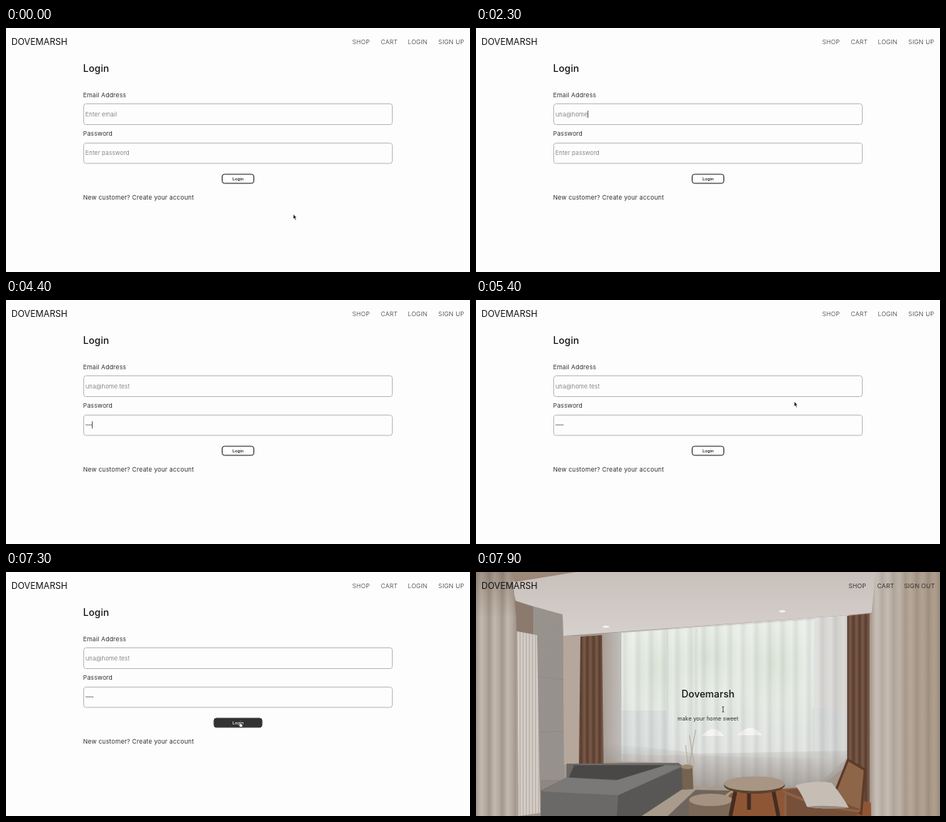
Write an HTML page that moves like this. It is 600 by 317 pixels and loops after 8000 ms.

```html
<!DOCTYPE html>
<html lang="en">
<head>
<meta charset="utf-8">
<title>Shop login</title>
<style>
  html, body { margin: 0; width: 100%; height: 100%; overflow: hidden; background: #fefdfe; }
  svg { display: block; width: 600px; height: 317px; }
  text { font: 400 8px Inter, sans-serif; letter-spacing: .15px; fill: #333; white-space: pre; }
  .brand { font-size: 11.4px; letter-spacing: 0; fill: #111; }
  .title { font-size: 12.4px; font-weight: 450; fill: #111; }
  .light { font-weight: 300; }
  .field { fill: #fefdfe; stroke: #b9b9b9; }
  .entry { font-size: 7.6px; font-weight: 300; fill: #666; }
  .tag { font-size: 5.4px; font-weight: 500; letter-spacing: 0; text-anchor: middle; }
  .mid { text-anchor: middle; }
  .slogan { font-size: 7px; letter-spacing: .1px; fill: #2c2a28; }
</style>
</head>
<body>
<svg viewBox="0 0 600 317">
  <defs>
    <linearGradient id="ceiling" x2="0" y2="1">
      <stop stop-color="#c9c0bb"/><stop offset="1" stop-color="#d6d0cc"/>
    </linearGradient>
    <linearGradient id="drapeLeft" gradientUnits="userSpaceOnUse" x2="17" spreadMethod="repeat">
      <stop stop-color="#a3978c"/><stop offset=".4" stop-color="#c3b9b0"/>
      <stop offset=".75" stop-color="#b5aaa0"/><stop offset="1" stop-color="#a3978c"/>
    </linearGradient>
    <linearGradient id="drapeRight" gradientUnits="userSpaceOnUse" x1="510" x2="600">
      <stop stop-color="#aea398"/><stop offset=".1" stop-color="#c3bab1"/>
      <stop offset=".35" stop-color="#b9aea3"/><stop offset=".6" stop-color="#ac9c8b"/>
      <stop offset="1" stop-color="#a39280"/>
    </linearGradient>
    <linearGradient id="folds" gradientUnits="userSpaceOnUse" x1="510" x2="525" spreadMethod="repeat">
      <stop stop-color="#6b5a4a" stop-opacity=".14"/><stop offset=".5" stop-color="#fff" stop-opacity=".1"/>
      <stop offset="1" stop-color="#6b5a4a" stop-opacity=".14"/>
    </linearGradient>
    <linearGradient id="shade" x2="0" y2="1">
      <stop stop-color="#64503f" stop-opacity=".35"/><stop offset="1" stop-color="#64503f" stop-opacity="0"/>
    </linearGradient>
    <linearGradient id="brown" gradientUnits="userSpaceOnUse" x2="8" spreadMethod="repeat">
      <stop stop-color="#573d30"/><stop offset=".5" stop-color="#7c5b48"/><stop offset="1" stop-color="#573d30"/>
    </linearGradient>
    <linearGradient id="net" gradientUnits="userSpaceOnUse" x1="162" x2="482">
      <stop stop-color="#a79d95"/><stop offset=".09" stop-color="#c4c1be"/>
      <stop offset=".86" stop-color="#cfcecb"/><stop offset="1" stop-color="#c3bfbb"/>
    </linearGradient>
    <linearGradient id="hem" x2="0" y2="1">
      <stop stop-color="#7d756e" stop-opacity="0"/><stop offset="1" stop-color="#7d756e" stop-opacity=".6"/>
    </linearGradient>
    <linearGradient id="sheer" gradientUnits="userSpaceOnUse" x2="17" spreadMethod="repeat">
      <stop stop-color="#fff" stop-opacity=".4"/><stop offset=".35" stop-color="#cfd2d0" stop-opacity=".3"/>
      <stop offset=".6" stop-color="#fff" stop-opacity=".25"/><stop offset="1" stop-color="#fff" stop-opacity=".4"/>
    </linearGradient>
    <linearGradient id="view" x2="0" y2="1">
      <stop stop-color="#e0e7df"/><stop offset=".5" stop-color="#dbe2d9"/><stop offset="1" stop-color="#d2d5d2"/>
    </linearGradient>
    <radialGradient id="leaves">
      <stop stop-color="#bccbb2" stop-opacity=".5"/><stop offset="1" stop-color="#bccbb2" stop-opacity="0"/>
    </radialGradient>
    <linearGradient id="radiator" gradientUnits="userSpaceOnUse" x1="53" x2="57" spreadMethod="repeat">
      <stop stop-color="#b8aea7"/><stop offset=".5" stop-color="#ded8d3"/><stop offset="1" stop-color="#b8aea7"/>
    </linearGradient>
    <linearGradient id="column" x2="0" y2="1">
      <stop stop-color="#98928d"/><stop offset="1" stop-color="#96918d"/>
    </linearGradient>
  </defs>

  <g id="login">
    <rect width="600" height="317" fill="#fefdfe"/>
    <text class="brand" x="7" y="22.4">DOVEMARSH</text>
    <text class="light" x="447.7" y="21.2">SHOP</text>
    <text class="light" x="484.7" y="21.2">CART</text>
    <text class="light" x="519.7" y="21.2">LOGIN</text>
    <text class="light" x="559" y="21.2">SIGN UP</text>
    <text class="title" x="99.8" y="57.2">Login</text>
    <text x="99.7" y="89.7">Email Address</text>
    <rect class="field" x="100.5" y="98.5" width="399" height="27" rx="3"/>
    <text class="entry" id="email" x="102.7" y="114.6"></text>
    <text x="99.7" y="140.2">Password</text>
    <rect class="field" x="100.5" y="149.5" width="399" height="26.4" rx="3"/>
    <text class="entry" id="hint" x="102.7" y="165">Enter password</text>
    <g id="dots" fill="#555"></g>
    <rect id="caret" width=".8" height="9.4" fill="#333"/>
    <rect id="button" y="190" height="11.8" rx="3" stroke="#222"/>
    <text class="tag" id="tag" x="300" y="197.7">Login</text>
    <text x="99.7" y="223.1">New customer? Create your account</text>
  </g>

  <g id="home">
    <rect width="600" height="317" fill="#a3968b"/>
    <path d="M40 0H520V52L480 56 113 83 112 55 72 44 52 38Z" fill="url(#ceiling)"/>
    <path d="M40 0H130L50 13Z" fill="#9b8878"/>
    <path d="M50 37L74 45V82L50 77Z" fill="#8b7a6d"/>
    <path d="M113 83H136V250H113Z" fill="#b5a79b"/>
    <path d="M162 80L482 56V250L440 282H284L262 248 162 246Z" fill="url(#net)"/>
    <path d="M188 79L440 62V243L188 236Z" fill="url(#view)"/>
    <g fill="url(#leaves)">
      <ellipse cx="235" cy="125" rx="42" ry="54"/><ellipse cx="300" cy="110" rx="50" ry="45"/>
      <ellipse cx="385" cy="118" rx="50" ry="56"/>
    </g>
    <g fill="#bfc6c7" opacity=".5">
      <path d="M188 180H248V236H188Z"/><path d="M435 177H480V238H435Z"/>
      <path d="M246 75h3V238h-3ZM283 73h4V240h-4ZM437 63h3V243h-3Z"/>
    </g>
    <path d="M292 213Q307 195 321 213ZM338 212Q355 193 370 212Z" fill="#f1f0ee"/>
    <path d="M188 79L482 56V240L440 278 284 281 262 248 188 246Z" fill="url(#sheer)"/>
    <path d="M163 222L262 232 284 236 482 232V250L440 282H284L262 248 162 246Z" fill="url(#hem)"/>
    <path d="M135 84L163 82 165 250H133Z" fill="url(#brown)"/>
    <path d="M480 57L509 54V317H490L480 254Z" fill="url(#brown)"/>
    <path d="M74 45L112 56 114 272H80Z" fill="url(#column)"/>
    <path d="M77 136L113 140M79 208L113 207" stroke="#88837e" stroke-width=".6"/>
    <path d="M53 77L79 82 83 313 55 317Z" fill="url(#radiator)"/>
    <path d="M83 270H115V317H83Z" fill="#8f8780"/>
    <g fill="#f4f1ee"><ellipse cx="168" cy="71" rx="4" ry="1.5"/><ellipse cx="396" cy="51" rx="4" ry="1.5"/></g>

    <path d="M205 317L266 278 340 280V317Z" fill="#a89b8b"/>
    <path d="M248 317L284 283 330 284 285 317Z" fill="#6d655e"/>
    <path d="M300 317L330 287 420 280 512 300V317Z" fill="#8f5635"/>
    <path d="M117 249L262 248 267 252V282L214 317H84V284L117 267Z" fill="#6b6967"/>
    <path d="M127 251H245L203 271 120 267Z" fill="#4a4846"/>
    <path d="M84 285L117 267 180 271 245 251 266 252 184 290Z" fill="#7b7977"/>
    <path d="M184 290L267 253V282L214 317H182Z" fill="#595755"/>
    <path d="M266 254L280 253 281 282 267 283Z" fill="#75634f"/>
    <ellipse cx="273" cy="253" rx="8" ry="3" fill="#9c8872"/>
    <path d="M276 212L282 250M284 205L276 250M271 225L274 250" fill="none" stroke="#b5a894" stroke-width="1"/>

    <path d="M275 296V317H332V296Z" fill="#7b6856"/>
    <ellipse cx="303.500" cy="296" rx="28" ry="8" fill="#a59280"/>
    <path d="M336 282L329 317M384 282L391 317M353 285V309" stroke="#432d22" stroke-width="5"/>
    <ellipse cx="360" cy="277" rx="39.500" ry="11" fill="#59432f"/>
    <ellipse cx="360" cy="275" rx="39.500" ry="9.500" fill="#a89583"/>
    <path d="M481 244L503 257 498 314 462 292Z" fill="#8d6549" stroke="#5c3a27" stroke-width="3"/>
    <path d="M397 284L425 281 499 309 490 317H402Z" fill="#77503a"/>
    <path d="M397 285L440 303 496 311M400 288V317" fill="none" stroke="#8d6247" stroke-width="3"/>
    <path d="M413 277Q440 270 460 274 473 290 482 306 450 309 428 305 422 289 413 277Z" fill="#c6beb5"/>
    <path d="M428 305Q450 302 482 306 450 309 428 305Z" fill="#948b82"/>

    <path d="M0 0H47L52 60 55 317H0Z" fill="url(#drapeLeft)"/>
    <path d="M0 0H47L52 60H0Z" fill="url(#shade)"/>
    <path id="curtain" d="M517 0H600V317H511L509 80Z" fill="url(#drapeRight)"/>
    <use href="#curtain" style="fill:none"/>
    <path d="M517 0H600V317H511L509 80Z" fill="url(#folds)"/>
    <text class="brand" x="7" y="22.4">DOVEMARSH</text>
    <text x="481.700" y="21.200">SHOP</text>
    <text x="518.700" y="21.200">CART</text>
    <text x="553.500" y="21.200">SIGN OUT</text>
    <text class="title mid" x="300" y="163">Dovemarsh</text>
    <text class="slogan mid" x="300" y="193">make your home sweet</text>
  </g>

  <g id="pointer">
    <path id="arrow" d="M0 0V6.300L1.500 5 2.600 7.500 3.700 7 2.600 4.600H4.500Z" fill="#111" stroke="#fff" stroke-width=".5"/>
    <path id="beam" d="M-1.400 -3.500Q0 -3.500 0 -2.500 0 -3.500 1.400 -3.500M0 -2.800V2.800M-1.400 3.500Q0 3.500 0 2.500 0 3.500 1.400 3.500" fill="none" stroke="#222" stroke-width=".7"/>
    <path id="hand" d="M-.6 0Q.2 -1 .8 0L1 2.400 3.400 3.200Q3.800 5 3 6.600H.2L-1.800 3.800Q-1.600 3 -.4 3.800Z" fill="#fff" stroke="#111" stroke-width=".6"/>
  </g>
</svg>
<script>
const LOOP = 8000, TICK = 100;
const EMAIL = "una@home.test", HINT = "Enter email";
const $ = id => document.getElementById(id);
const show = (id, on) => { $(id).style.display = on ? "" : "none"; };
const within = (t, from, to) => t >= from && t < to;

// Times at which characters arrive
const emailKeys = [1200, 1300, 1400, 1800, 2000, 2100, 2200, 2300, 2500, 2800, 3000, 3000, 3000];
const passKeys = [3900, 4000, 4100, 4400, 4800];
const typed = (keys, t) => keys.filter(k => k <= t).length;

// Pointer stops: time, shape, x, y
const stops = [
  [0, "arrow", 371.5, 242], [100, "arrow", 372, 224], [200, "beam", 374, 168],
  [300, "arrow", 375, 127], [400, "beam", 375.5, 112], [1100, ""],
  [5200, "beam", 380, 112], [5300, "beam", 402, 119], [5400, "arrow", 411.5, 132],
  [5500, "arrow", 409, 145], [5600, "beam", 388, 164], [5700, "arrow", 350, 179],
  [5800, "arrow", 325, 185], [6200, "arrow", 318, 187], [6300, "hand", 310, 191],
  [6400, "hand", 305, 194], [6500, "hand", 302.5, 195],
  [7400, "arrow", 302.5, 194], [7500, "arrow", 305, 191], [7600, "arrow", 313, 183],
  [7700, "beam", 319.5, 178.5]
];

passKeys.forEach((_, i) => $("dots").insertAdjacentHTML("beforeend",
  `<circle cx="${103.8 + i * 2.1}" cy="162.300" r=".75"/>`));

function drawFields(t) {
  const chars = typed(emailKeys, t), dots = typed(passKeys, t);
  const email = $("email"), inPass = t >= 3300;
  email.textContent = chars ? EMAIL.slice(0, chars) : HINT;
  show("hint", !dots);
  [...$("dots").children].forEach((dot, i) => dot.style.display = i < dots ? "" : "none");

  const textEnd = inPass ? dots * 2.1 : chars ? email.getComputedTextLength() : 0;
  $("caret").setAttribute("x", 102.7 + textEnd);
  $("caret").setAttribute("y", inPass ? 157.5 : 107.3);
  show("caret", within(t, 700, 1100) || within(t, 1200, 3800) ||
    within(t, 3900, 5200) || within(t, 5700, 6200));
}

function drawButton(t) {
  const p = Math.min(1, Math.max(0, (t - 6300) / 500));
  const k = p * p * (3 - 2 * p), width = 41 + 21 * k;
  const grey = (a, b) => `rgb(${Array(3).fill(Math.round(a + (b - a) * k))})`;
  $("button").setAttribute("x", 300 - width / 2);
  $("button").setAttribute("width", width);
  $("button").style.fill = grey(254, 51);
  $("button").style.stroke = grey(28, 51);
  $("tag").style.fill = grey(10, 255);
}

function drawPointer(t) {
  const [, shape, x = 0, y = 0] = stops.findLast(s => s[0] <= t);
  $("pointer").setAttribute("transform", `translate(${x} ${y})`);
  for (const id of ["arrow", "beam", "hand"]) show(id, id === shape);
}

let start;
function frame(now) {
  start ??= now;
  const t = Math.floor((now - start) % LOOP / TICK) * TICK;
  show("login", t < 7400);
  show("home", t >= 7400);
  drawFields(t);
  drawButton(t);
  drawPointer(t);
  requestAnimationFrame(frame);
}
requestAnimationFrame(frame);
</script>
</body>
</html>
```
